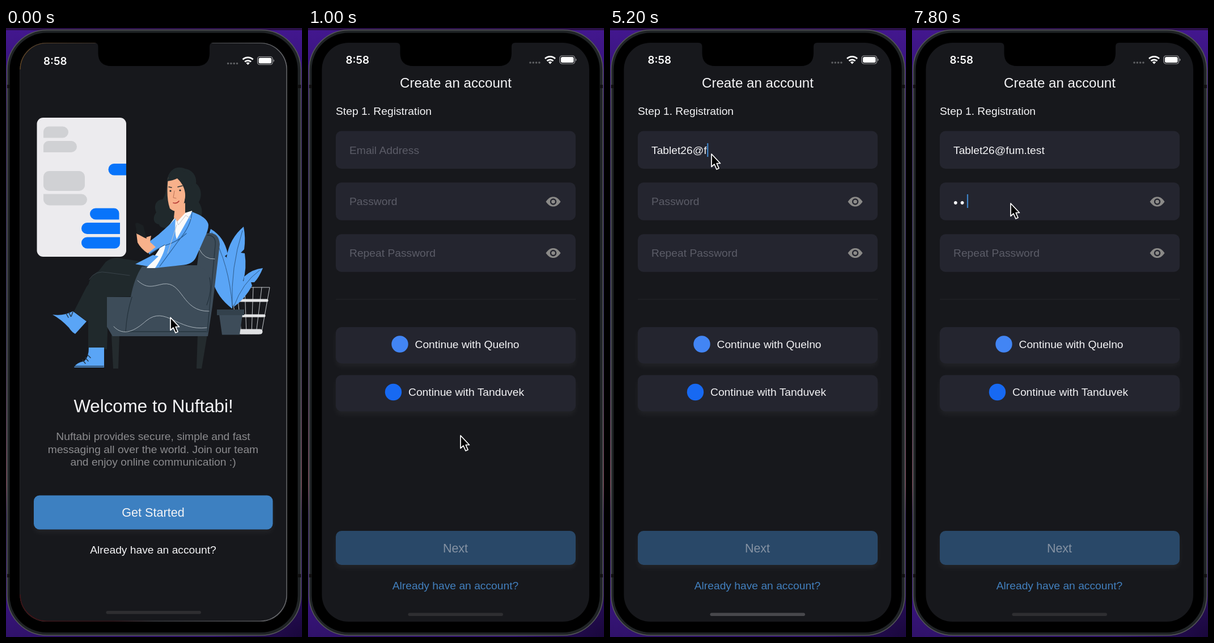
Recreate the animation shown at these times as an HTML page. Size 522 by 1073 pixels, loop 8 s.

```html
<!DOCTYPE html>
<html lang="en">
<head>
<meta charset="utf-8">
<title>Sign up</title>
<style>
html, body { margin: 0; width: 100%; height: 100%; overflow: hidden; background: #2d1167; }
svg { display: block; width: 522px; height: 1073px; font: 19.25px "Liberation Sans", Arial, sans-serif; fill: #f4f4f6; }
.mid { text-anchor: middle; }
.hint { fill: #5b5c67; }
.soft { fill: #8b8b8e; }
.field { fill: #24252f; }
.raised { filter: drop-shadow(0 6px 5px rgba(255,255,255,.045)); }
.line { fill: none; stroke-linecap: round; stroke-linejoin: round; }
.skin { fill: #f8b18b; }
.dark { fill: #20292c; }
.chair { fill: #3d4c59; }
.blue { fill: #5aa5f6; }
.grey { fill: #d0d1d4; }
.sent { fill: #0874fa; }
</style>
</head>
<body>
<svg viewBox="0 0 522 1073">
  <defs>
    <linearGradient id="desk" x2="0" y2="1">
      <stop stop-color="#43178f"/><stop offset=".06" stop-color="#3a1580"/>
      <stop offset=".14" stop-color="#27124f"/><stop offset=".5" stop-color="#242049"/>
      <stop offset=".75" stop-color="#673345"/><stop offset=".8" stop-color="#251347"/>
      <stop offset=".95" stop-color="#371479"/><stop offset="1" stop-color="#30126a"/>
    </linearGradient>
    <radialGradient id="dusk" gradientUnits="userSpaceOnUse" cx="522" cy="1073" r="160">
      <stop stop-color="#12042c" stop-opacity=".75"/><stop offset="1" stop-color="#12042c" stop-opacity="0"/>
    </radialGradient>
    <linearGradient id="rim" x2="1" y2="0">
      <stop stop-color="#6d4b22"/><stop offset=".15" stop-color="#55402c"/>
      <stop offset=".45" stop-color="#25262a"/><stop offset="1" stop-color="#77787b"/>
    </linearGradient>
    <linearGradient id="rimLow" x2="1" y2="0">
      <stop stop-color="#4c1013"/><stop offset=".35" stop-color="#3c1014"/>
      <stop offset=".5" stop-color="#444549"/><stop offset="1" stop-color="#77787b"/>
    </linearGradient>
    <clipPath id="screen"><rect x="24.5" y="26" width="471.5" height="1020" rx="47"/></clipPath>
    <clipPath id="card"><rect x="54.500" y="158" width="157.500" height="245" rx="11"/></clipPath>
    <g id="eye">
      <path fill="#8b8a88" d="M-13 0C-9-6-5-8.500 0-8.500S9-6 13 0C9 6 5 8.500 0 8.500S-9 6-13 0Z"/>
      <circle r="5.700" fill="#24252f"/><circle r="3.300" fill="#8b8a88"/>
    </g>
  </defs>

  <rect width="522" height="1073" fill="url(#desk)"/>
  <rect width="522" height="1073" fill="url(#dusk)"/>
  <rect width="522" height="4" fill="#2a1048"/>
  <rect x="2" y="3.500" width="518" height="1066.500" rx="70" fill="#202426" stroke="#56585a" stroke-width="1.500"/>
  <rect x="6.500" y="8.500" width="508" height="1056.500" rx="65" fill="#000"/>
  <path d="M2 103h5M2 965h5M515 103h5M515 965h5" stroke="#111" stroke-width="6"/>

  <g clip-path="url(#screen)">
    <rect id="base" x="24" y="26" width="473" height="1021"/>
    <g id="splash">
      <rect x="195" y="463" width="137" height="114" rx="22" fill="#5f66a0"/>
      <text x="260.500" y="629" class="mid" font-size="39" font-weight="700" fill="#3c6ca6">Nuftabi</text>
    </g>

    <g id="form">
      <rect x="49" y="135" width="423" height="570" fill="#17181c"/>
      <text x="260.500" y="105" class="mid" font-size="24.100">Create an account</text>
      <text x="49" y="153">Step 1. Registration</text>
      <g class="field">
        <rect x="49" y="181.500" width="423" height="66.500" rx="10"/>
        <rect x="49" y="272.300" width="423" height="66.500" rx="10"/>
        <rect x="49" y="363.200" width="423" height="66.500" rx="10"/>
      </g>
      <text id="mail" x="73" y="222"></text>
      <text id="pass" x="73" y="312"></text>
      <text x="73" y="403" class="hint">Repeat Password</text>
      <rect id="caret" width="2.200" height="24" fill="#3d82c6"/>
      <use href="#eye" x="432.500" y="306"/><use href="#eye" x="432.500" y="396.500"/>
      <path d="M49 478h423" stroke="#25262b"/>
      <g class="field raised">
        <rect x="49" y="527" width="423" height="64" rx="10"/>
        <rect x="49" y="611.500" width="423" height="64" rx="10"/>
      </g>
      <circle cx="162" cy="557" r="14.700" fill="#4285f4"/>
      <text x="188.500" y="563.500">Continue with Quelno</text>
      <circle cx="150.500" cy="641.500" r="14.700" fill="#1769f2"/>
      <text x="177" y="648">Continue with Tanduvek</text>
      <rect x="49" y="886" width="423" height="60" rx="10" fill="#294868" class="raised"/>
      <text x="260" y="923.500" class="mid" font-size="21.500" fill="#8592a3">Next</text>
      <text x="260" y="988.500" class="mid" fill="#427fbd">Already have an account?</text>
    </g>

    <g id="welcome">
      <rect x="24" y="26" width="473" height="1021" fill="#17181c"/>
      <rect x="54.500" y="158" width="157.500" height="245" rx="11" fill="#ecebee"/>
      <g class="grey">
        <path d="M75 173.500h25a10 10 0 0 1 0 20H66v-11a9 9 0 0 1 9-9ZM75 199h40a10 10 0 0 1 0 20H66v-11a9 9 0 0 1 9-9Z"/>
        <rect x="66" y="252" width="73" height="35" rx="10"/>
        <path d="M66 292.500h67a10 10 0 0 1 0 20H77a11 11 0 0 1-11-11Z"/>
      </g>
      <g class="sent" clip-path="url(#card)">
        <rect x="180.500" y="239" width="50" height="20.500" rx="10"/>
        <path d="M158 317.500h32a9 9 0 0 1 9.500 9v11H158a10 10 0 0 1 0-20ZM143 343h58v20H143a10 10 0 0 1 0-20ZM143 368.500h58v11a9 9 0 0 1-9 9H143a10 10 0 0 1 0-20Z"/>
      </g>

      <!-- basket and plant -->
      <g class="line" stroke="#c3c6ca" stroke-width="1">
        <path d="M395 457h70l-14 78q-1 4-5 4h-30q-5 0-6-5ZM407 457l8 82M421 457l3 82M436 457l-3 82M451 457l-10 82"/>
        <path d="M399 480h61M404 507h51" stroke="#e3e4e6" stroke-width="5"/>
        <path d="M412 535h36" stroke="#dfe0e2" stroke-width="9"/>
      </g>
      <g class="blue">
        <path d="M398 494C383 482 369 466 364 443L369 440 360 429 362 404 367 400 359 391Q354 371 361 354Q385 368 391 398L386 402 394 408Q402 448 399 494Z"/>
        <path d="M398 492Q384 454 388 413L394 410 389 404Q394 371 419 350Q423 370 420 390L414 396 421 397Q425 424 418 446L411 452 416 454Q410 478 398 492Z"/>
        <path d="M401 492Q403 461 415 444L419 446 420 438Q434 425 453 423Q446 440 438 448L432 448 434 454Q421 478 401 492Z"/>
      </g>
      <path class="line" stroke="#315d8c" d="M399 490Q396 422 417 357M399 490Q394 418 363 360M402 490Q417 449 447 427"/>
      <path class="chair" d="M376 505h41l-5 35.500h-31Z"/>
      <rect x="372" y="496" width="48" height="10" fill="#33414c"/>

      <!-- rear hair and legs -->
      <path class="dark" d="M284 267C288 248 302 242 316 248C330 250 337 263 335 274C345 282 346 296 340 307C347 317 347 329 342 337C350 351 336 361 321 354L296 347C285 356 270 352 270 346C258 344 259 332 265 325C259 311 267 302 276 302C283 293 283 279 284 267Z"/>
      <path class="dark" d="M242 412 197 405Q186 404 176 412L142 456 120 499 143 517 188 451 235 439Z"/>
      <path class="dark" d="M240 420 179 422Q148 430 145 455L145 566H178L181 474 226 473Z"/>
      <path class="line" stroke="#39434a" d="M147 443Q157 426 180 431L218 436"/>
      <path class="blue" d="M82 505Q101 508 118 499L142 517 122 539Q116 536 111 528 97 513 82 505ZM146 563H173V598H120Q123 590 138 587Q146 580 146 563Z"/>
      <path class="line" stroke="#263645" stroke-width="1.500" d="M106 503l4 7M111 501l3 7M118 500l-3 8M135 585l5 6M140 581l5 6M144 576l5 5M121 596h51"/>

      <!-- armchair -->
      <path fill="#242b2e" d="M186 540h14l-2 60h-9ZM338 540h17l-10 60h-9Z"/>
      <path class="chair" d="M337 418 344 364Q375 354 377 381L364 490 356 543H188L178 526V474H220Q226 441 240 420Z"/>
      <path class="chair" d="M178 474H222Q226 441 241 421L325 418Q357 418 360 446Q363 465 357 478L353 543H188L178 526Z"/>
      <path class="line" stroke="#26343e" stroke-width="1.300" d="M222 474Q213 502 211 535H353M359 440Q364 462 354 488M355 365Q371 365 369 383L355 536"/>
      <path class="line" stroke="#aab4bc" d="M232 445C249 460 258 455 277 451C313 446 309 500 358 499M190 526C208 545 229 532 247 516C282 488 302 535 354 528M341 390Q350 408 368 407"/>

      <!-- torso -->
      <path fill="#fafafa" d="M299 332 315 326 328 322 330 337 302 382 275 411 263 423H248L270 390 286 350Z"/>
      <path class="skin" d="M298 316 316 308 316 326 302 341 296 334Z"/>
      <path class="blue" d="M228 416 259 400 269 402 250 420Z"/>
      <path class="blue" d="M328 324Q355 333 357 347Q357 356 350 370L335 404Q329 417 309 418L263 423Q281 395 281 381L253 399 244 383 269 364 291 344 299 335Q297 363 301 372Z"/>
      <path class="line" stroke="#2a6098" stroke-width="1.200" d="M328 324Q327 348 304 375L271 420M281 383Q302 377 318 362M254 397 280 382"/>
      <path class="line" stroke="#c4c5c9" d="M300 337l4 10 13-17 9 6M301 347l-16 50"/>
      <path class="skin" d="M230 362Q240 363 243 370L256 366 254 377 264 386 250 397Q238 389 232 378Z"/>
      <path fill="#1b2023" d="M228 345q2-3 6-1l8 4 6 23-8-3-9-5Z"/>
      <path class="skin" d="M232 363l13 7-3 4-11-6ZM234 369l13 6-3 4-11-5Z"/>

      <!-- head -->
      <path class="skin" d="M286 264Q300 258 316 274L317 292Q315 311 309 319Q299 327 289 318Q282 299 286 264Z"/>
      <path class="dark" d="M284 270Q291 246 318 253Q331 260 326 285L315 305Q320 282 302 265Q294 269 284 270Z"/>
      <path class="line" stroke="#273135" stroke-width="1.500" d="M287 280l5 1M303 280l8-2"/>
      <circle cx="290" cy="287" r="1.600" class="dark"/><circle cx="307" cy="286" r="1.600" class="dark"/>
      <path class="line" stroke="#bc7257" d="M297 287l-2 12 5 1"/>
      <path class="line" stroke="#b83c37" stroke-width="1.700" d="M295 308q6 2 10-3"/>

      <text x="260" y="677" class="mid" font-size="31.300">Welcome to Nuftabi!</text>
      <g class="mid soft">
        <text x="259.500" y="726">Nuftabi provides secure, simple and fast</text>
        <text x="259.500" y="748.500">messaging all over the world. Join our team</text>
        <text x="259.500" y="771">and enjoy online communication :)</text>
      </g>
      <rect x="49" y="823.500" width="421.500" height="60" rx="10" fill="#3d80c1" class="raised"/>
      <text x="259.500" y="861" class="mid" font-size="21.600">Get Started</text>
      <text x="259.500" y="925.500" class="mid">Already have an account?</text>
    </g>
  </g>

  <g id="edge" fill="none" stroke-width="1.200">
    <path stroke="url(#rim)" d="M25 73A47 47 0 0 1 72 26.500H448A47 47 0 0 1 495 73V998"/>
    <path stroke="url(#rimLow)" d="M25 998A47 47 0 0 0 72 1045H448A47 47 0 0 0 495 998"/>
  </g>
  <path fill="#000" d="M156 24H365V26Q359 26 359 33V44Q359 67 336 67H186Q162.500 67 162.500 44V33Q162.500 26 156 26Z"/>
  <g id="status" fill="#fff">
    <text x="66.500" y="63" font-family="Inter, sans-serif" font-size="18.800" font-weight="600">8:58</text>
    <path class="line" stroke="#77787b" stroke-opacity=".75" stroke-width="3.600" d="M392 61h.01M397.300 61h.01M402.600 61h.01M407.900 61h.01"/>
    <path class="line" style="stroke-linecap:butt" stroke="#fff" stroke-width="2.800" d="M418 54a13 13 0 0 1 18 0M421.500 58a8 8 0 0 1 11 0"/>
    <path d="M423.800 60.300q3.200-2.600 6.400 0l-3.200 3.200Z"/>
    <rect x="444" y="49" width="26.500" height="14" rx="4" fill="none" stroke="#a5a5a8" stroke-width="1.200"/>
    <rect x="446" y="51" width="22.500" height="10" rx="2.500"/>
    <path fill="#a5a5a8" d="M472 53.500q3 2.500 0 5Z"/>
  </g>
  <rect id="home" x="176.500" width="167.500" height="5.500" rx="2.700"/>
  <path id="pointer" fill="#000" stroke="#fff" stroke-width="1.700" stroke-linejoin="round" d="M0 0V22.500L5 18 9 27 13 25.200 9.200 16.500H15.500Z"/>
</svg>
<script>
const $ = id => document.getElementById(id);
const address = "Tablet26@fum.test";
const pointerPath = [
  [0, 290, 510], [200, 276, 620], [400, 238, 805], [600, 228, 846], [800, 228, 843],
  [1000, 269, 718], [1200, 264, 620], [1800, 179, 222], [6600, 179, 222], [7200, 174, 309], [8000, 174, 309]
];

function pointerAt(t) {
  const i = pointerPath.findIndex(p => p[0] > t);
  const [t0, x0, y0] = pointerPath[i - 1], [t1, x1, y1] = pointerPath[i];
  const k = (t - t0) / (t1 - t0);
  return [x0 + (x1 - x0) * k, y0 + (y1 - y0) * k];
}

function typedCount(t) {
  if (t < 3000) return 0;
  const n = t < 5200 ? 1 + Math.floor((t - 3000) * 9 / 2200) : 10 + Math.floor((t - 5200) / 200);
  return Math.min(n, address.length);
}

function show(id, on) { $(id).style.display = on ? "" : "none"; }

function setInput(id, value, hint) {
  $(id).textContent = value || hint;
  $(id).setAttribute("class", value ? "" : "hint");
  return value ? $(id).getComputedTextLength() : 0;
}

function draw(now) {
  const t = Math.floor(now % 8000 / 200) * 200;   // the screen refreshes five times a second
  const slide = Math.min(Math.max(t - 600, 0) / 200 * 717.5, 1020);
  const onWelcome = slide === 0, fading = slide < 1020;

  show("welcome", fading);
  show("splash", fading);
  show("edge", onWelcome);
  $("welcome").setAttribute("transform", `translate(0 ${slide})`);
  $("base").setAttribute("fill", fading ? "#616264" : "#17181c");
  $("form").setAttribute("opacity", fading ? .39 : 1);
  $("status").setAttribute("transform", onWelcome ? "translate(-.4 1.5)" : "");
  $("home").setAttribute("y", onWelcome ? 1027 : 1030.5);
  $("home").setAttribute("fill", t >= 1800 && t < 7200 ? "#48484c" : "#2e2e31");

  const dots = "•".repeat(t < 7600 ? 0 : (t - 7400) / 200);
  $("pass").setAttribute("font-size", dots ? 22 : 19.25);
  $("pass").setAttribute("letter-spacing", dots ? 4 : 0);
  $("pass").setAttribute("y", dots ? 315 : 312);
  const mailWidth = setInput("mail", address.slice(0, typedCount(t)), "Email Address");
  const passWidth = setInput("pass", dots, "Password");
  const inPass = t >= 7200;
  show("caret", t >= 2000);
  $("caret").setAttribute("x", 73.5 + (inPass ? passWidth : mailWidth));
  $("caret").setAttribute("y", inPass ? 293 : 203);

  $("pointer").setAttribute("transform", `translate(${pointerAt(t)})`);
  requestAnimationFrame(draw);
}
requestAnimationFrame(draw);
</script>
</body>
</html>
```
